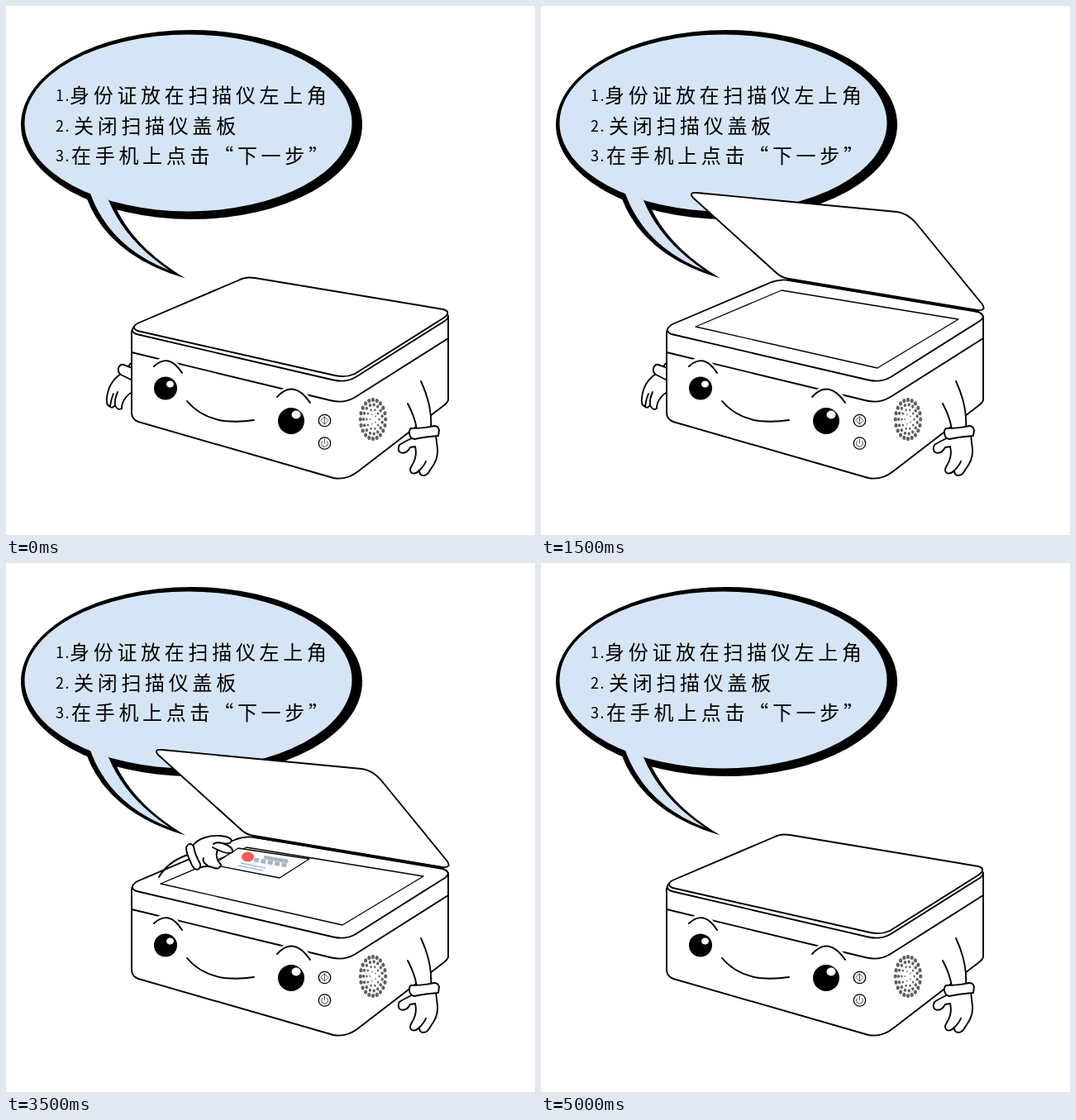
These frames come from a looping animation (640 by 640 pixels, 7.5 s). An HTML page:

```html
<!DOCTYPE html>
<html lang="zh-CN">
<head>
<meta charset="utf-8">
<title>扫描仪</title>
<style>
  html, body { margin: 0; width: 100%; height: 100%; overflow: hidden; background: #fff; }
  svg { display: block; width: 100%; height: 100%; }
  text { font: 24px "Noto Sans CJK SC", "Noto Sans CJK", sans-serif; letter-spacing: 4.7px; fill: #000; }
  text.number { font-size: 18px; letter-spacing: 1.5px; }
  .ink { fill: #fff; stroke: #000; stroke-width: 1.9; stroke-linejoin: round; stroke-linecap: round; }
  .line { fill: none; }
  .thin { stroke-width: 1.3; }
  .icon { fill: none; stroke: #444; stroke-width: 0.9; }
  .hinge { stroke-width: 2.8; }
  .bare { stroke: none; }
  .halo { stroke: #fff; stroke-width: 7; }
  .sky { fill: #d6e5f5; }
  .print { fill: none; stroke: #a9b6c9; stroke-width: 4.5; stroke-linecap: butt; }
  .blocks { stroke-width: 5; stroke-dasharray: 6 2.5; }
  .rule { stroke: #a5bce0; stroke-width: 1.3; }
</style>
</head>
<body>
<svg viewBox="0 0 640 640">
  <g id="bubble">
    <ellipse cx="224.500" cy="143.500" rx="206.500" ry="114.500"/>
    <path d="M97 231Q123 302 217 329.500Q155 292 133 244Z"/>
    <ellipse class="sky" cx="220.500" cy="141.500" rx="198" ry="107"/>
    <path class="sky" d="M101 224Q124 291 198 320Q144 284 124 235Z"/>
  </g>
  <g id="advice"></g>

  <g class="ink" data-steps="0-3">
    <path d="M139 445Q124 455 122 474Q121 483 125 484Q128 488 132 483Q135 490 140 487Q140 480 144 475Q147 470 153 467V450Z"/>
    <path class="line" d="M132 483Q131 476 135 467M126 484Q127 476 130 469M148 436L152 431"/>
    <path d="M153 438L142 434Q138 433 136 438Q135 443 139 446L153 453Z"/>
  </g>
  <g class="ink" data-steps="4-4">
    <path d="M95 387L119 405L115 466L91 432Z"/>
    <path d="M152 446Q142 443 136 439L132 432Q126 426 119 429L108 434Q103 438 109 441L117 440Q108 446 109 452Q113 455 120 449Q115 458 118 462Q124 465 130 457L134 453L139 456Q144 461 152 464"/>
    <path class="line" d="M136 439Q131 446 134 453"/>
  </g>

  <g class="ink" id="body">
    <path d="M152 398Q151 389 159 385L279 334Q290 330 301 332L528 370Q536 372 535 379V477Q534 480 530 483L426 563Q412 574 396 571L160 503Q152 500 152 492Z"/>
    <path class="line" d="M153 392Q153 396 160 397.500L396 452.500Q411 456 423 449L531 381Q535 378 535 375M152 419L394 477.500Q409 481 422 473.500L535 402"/>
    <path class="thin" d="M291 344L505 379L407 438L187 388Z"/>
  </g>

  <g class="ink" id="face">
    <g id="brows">
      <path class="halo" d="M181 434Q197 420 211 442M330 472Q348 452 366 477"/>
      <path class="line" d="M179 436Q197 419 213 444M328 473Q348 451 368 480"/>
    </g>
    <path class="line" d="M219 478Q236 498 264 502Q281 504 300 501"/>
    <g class="bare">
      <circle cx="193" cy="462.500" r="14" fill="#000"/>
      <circle cx="345" cy="502" r="16" fill="#000"/>
      <ellipse cx="198.500" cy="457.500" rx="4.500" ry="4"/>
      <ellipse cx="351" cy="494.500" rx="5.500" ry="5"/>
    </g>
  </g>

  <g class="ink thin">
    <circle cx="385.500" cy="501.500" r="7.200"/>
    <circle cx="385.500" cy="529" r="7.200"/>
    <path class="icon" d="M385.500 497L390 501.500L385.500 506L381 501.500ZM385.500 497V506M385.500 524V529M382.500 526.500A4 4 0 1 0 388.500 526.500"/>
  </g>
  <g id="speaker" fill="#606060"></g>

  <g class="ink" id="rightArm">
    <path class="bare" d="M486 481L502 454Q516 484 514 511L497 516Q496 500 486 481Z"/>
    <path class="line" d="M502 454Q516 484 514 511M486 481Q496 500 497 514"/>
    <path d="M493 522Q482 527 476 531Q473 537 477 540Q484 543 489 534L495 533Q498 545 491 556Q487 562 491 565Q495 567 500 562Q500 568 505 568Q510 568 514 560Q523 549 522 536L520 519Z"/>
    <path class="line" d="M500 562Q506 556 508 551"/>
    <path d="M491 511Q506 511 518 508Q523 508 524 513L523 520Q508 521 494 524Q488 523 488 516Q488 511 491 511Z"/>
  </g>

  <path class="ink" data-steps="0-0,10-14" d="M281 332Q290 327 301 329L529 367Q539 370 530 377L422 445Q411 450 398 447L159 393Q151 389 159 384Z"/>
  <g class="ink" data-steps="1-1,9-9">
    <path d="M279 331Q290 327 301 329L529 367Q538 370 530 374L432 408Q421 413 408 411L156 364Q149 360 160 357Z"/>
    <path class="line" d="M301 331L529 369"/>
  </g>
  <g class="ink" data-steps="2-2">
    <path d="M290 328L170 267Q164 262 174 263L416 296Q427 297 436 303L531 365Q536 369 528 368L300 330Q295 330 290 328Z"/>
    <path class="line hinge" d="M299 331L529 369"/>
  </g>
  <g class="ink" data-steps="3-8">
    <path d="M286 324L184 232Q178 225 189 226L430 249Q444 251 454 263L534 361Q539 369 528 368L300 330Q292 329 286 324Z"/>
    <path class="line hinge" d="M299 331L529 369"/>
  </g>

  <g class="ink" data-steps="5-5">
    <path d="M178 378Q168 363 168 350Q170 337 177 333Q183 332 182 340L188 333Q193 344 204 347Q210 344 210 351Q209 357 204 362L200 368Z"/>
    <path class="thin" d="M184 269L208 287L205 365L183 333Z"/>
    <path class="bare" d="M181 349L189 338L190 348L203 364L184 374L174 359Z"/>
    <path class="line" d="M182 340Q177 346 177 350M189 333Q192 339 188 344Q186 348 190 350L204 364M178 378Q179 373 184 374"/>
  </g>

  <g class="ink thin" data-steps="7-8">
    <path d="M281 345L367 358L331 381L250 365Z"/>
    <ellipse class="bare" cx="292.500" cy="355.500" rx="7.500" ry="6" fill="#f45b56"/>
    <path class="print" d="M312 356L341 361"/>
    <path class="print blocks" d="M300 359L340 366"/>
    <path class="print rule" d="M284 363L314 369M281 366L311 372"/>
  </g>

  <g class="ink" data-steps="6-6">
    <path class="thin" d="M270 332L352 336L318 361L246 356Z"/>
    <use href="#reach"/>
  </g>
  <g class="ink" data-steps="7-7"><use href="#reach" x="4" y="4"/></g>
  <g class="ink" data-steps="8-8">
    <path d="M177 374Q168 362 168 347Q169 337 174 329Q178 323 181 328Q186 323 188 329L187 341Q188 348 193 351Q198 340 205 339Q211 339 209 345Q202 355 203 362L201 369Z"/>
    <path class="line" d="M181 328Q175 338 178 343M193 351Q190 354 192 358"/>
    <path d="M176 377Q176 371 182 370Q192 370 199 361Q204 361 205 366L179 377Z"/>
  </g>

  <defs>
    <g id="reach">
      <path class="line" d="M181 376Q192 357 216 349"/>
      <path d="M222 338C228 329 243 325 255 326Q268 327 269 332Q267 337 258 335Q272 340 270 346Q265 349 252 343Q248 352 256 361Q255 367 248 365Q240 361 229 365Z"/>
      <path class="line" d="M258 335Q251 333 247 336M252 343L246 340M240 362Q233 358 235 353"/>
      <path d="M216 337Q220 334 223 339Q225 350 231 360Q232 366 227 367Q222 366 219 357Q214 347 214 340Z"/>
    </g>
  </defs>
</svg>
<script>
const STEP = 500, LOOP = 7500;
const byId = id => document.getElementById(id);

function add(parent, tag, attributes, content = "") {
  const node = document.createElementNS("http://www.w3.org/2000/svg", tag);
  for (const key in attributes) node.setAttribute(key, attributes[key]);
  node.textContent = content;
  parent.append(node);
}

[
  ["1.", "身份证放在扫描仪左上角", 77],
  ["2.", "关闭扫描仪盖板", 82],
  ["3.", "在手机上点击“下一步”", 79]
].forEach(([number, line, x], row) => {
  const y = 117 + row * 36.5;
  add(byId("advice"), "text", { x: 60, y: y - 2, class: "number" }, number);
  add(byId("advice"), "text", { x, y }, line);
});

// Dots get smaller towards the middle of the speaker.
for (let ring = 1; ring <= 4; ring++) {
  const count = ring * 5;
  for (let i = 0; i < count; i++) {
    const angle = (i + ring / 2) / count * Math.PI * 2;
    add(byId("speaker"), "ellipse", {
      cx: 444 + Math.cos(angle) * ring * 3.8,
      cy: 500 + Math.sin(angle) * ring * 5.9,
      rx: 0.3 + ring * 0.45,
      ry: 0.4 + ring * 0.55
    });
  }
}

const poses = [...document.querySelectorAll("[data-steps]")].map(node => ({
  node,
  ranges: node.dataset.steps.split(",").map(range => range.split("-").map(Number))
}));

const start = performance.now();
function draw() {
  const step = Math.floor((performance.now() - start) % LOOP / STEP);
  for (const { node, ranges } of poses) {
    const shown = ranges.some(([first, last]) => step >= first && step <= last);
    node.style.display = shown ? "" : "none";
  }
  requestAnimationFrame(draw);
}
draw();
</script>
</body>
</html>
```
